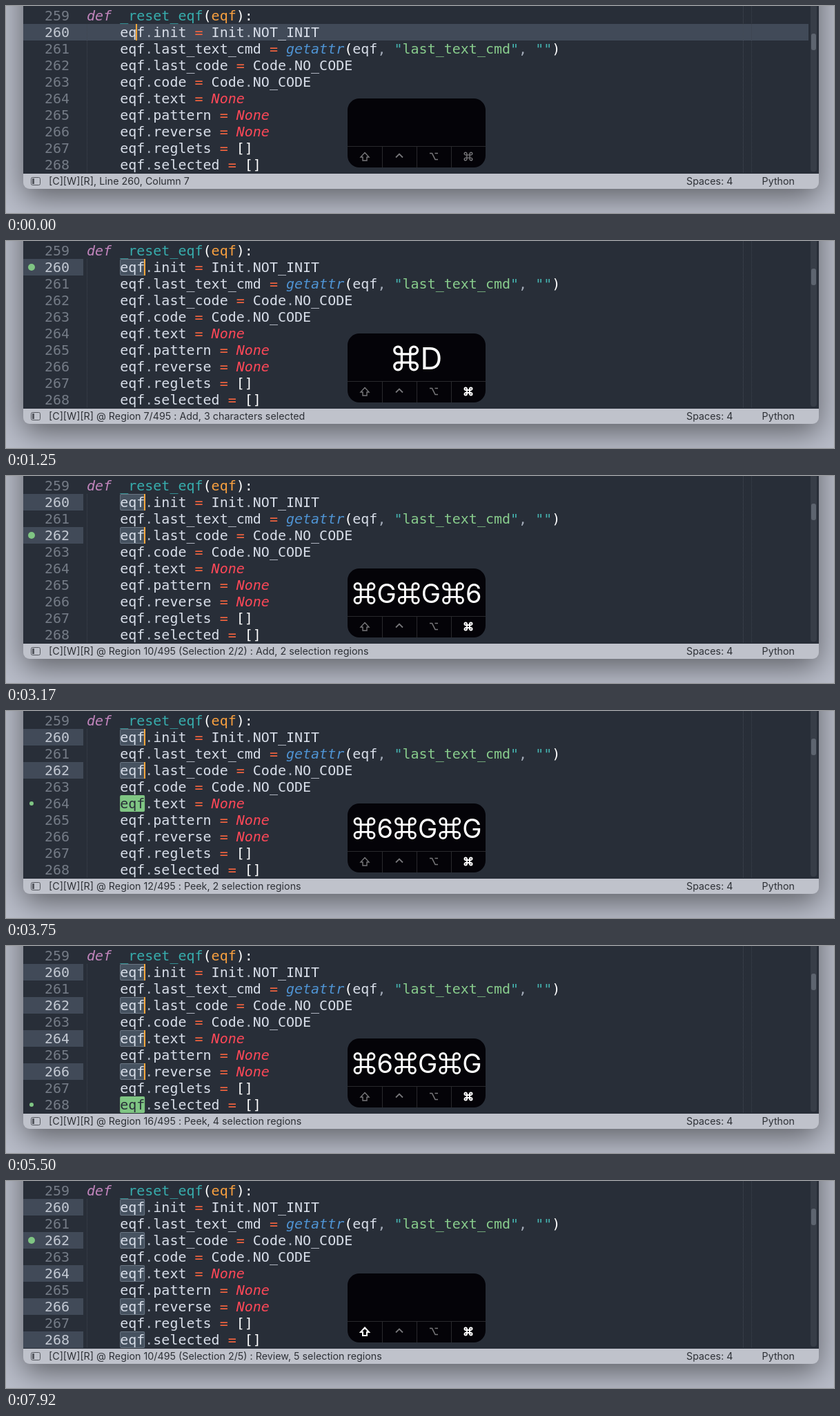
An HTML page with a canvas for the animation above (8000 ms loop, 1200 by 300 pixels).

```html
<!DOCTYPE html>
<html lang="en">
<head>
<meta charset="utf-8">
<title>Multiple selection</title>
<style>
html, body { margin: 0; width: 100%; height: 100%; overflow: hidden; background: #b4b8c3; }
canvas { display: block; }
</style>
</head>
<body>
<canvas id="stage" width="1200" height="300"></canvas>
<script>
const ctx = document.getElementById('stage').getContext('2d');
const LOOP = 8000, FIRST = 259, ROW = 24, CHAR = 12.04, CODE_X = 117;
const BG = '#282e38', ACTIVE = '#414a58', TEXT = '#d8dee9', CARET = '#f9a73c', GREEN = '#7fc583';
const MONO = '20px "DejaVu Sans Mono", monospace';
const UI = 'Inter, sans-serif';

const code = [
  'def _reset_eqf(eqf):',
  '    eqf.init = Init.NOT_INIT',
  '    eqf.last_text_cmd = getattr(eqf, "last_text_cmd", "")',
  '    eqf.last_code = Code.NO_CODE',
  '    eqf.code = Code.NO_CODE',
  '    eqf.text = None',
  '    eqf.pattern = None',
  '    eqf.reverse = None',
  '    eqf.reglets = []',
  '    eqf.selected = []'
];

// pattern, colour, italic
const syntax = [
  ['^def', '#c285bd', 1],
  ['_reset_eqf', '#37adad'],
  ['eqf(?=\\))', '#f9a03f'],
  ['getattr', '#4f94d4', 1],
  ['None', '#ff4858', 1],
  ['=', '#f9653f'],
  ['"', '#45b3b0'],
  ['last_text_cmd(?=")', '#88cc8c'],
  ['[()\\[\\]:]', '#ffffff'],
  ['[.,]', '#a4acb9'],
  ['\\w+|\\s+', TEXT]
];
const token = new RegExp(syntax.map(s => `(${s[0]})`).join('|'), 'g');

// time, key; the first region is on line 260, line 261 holds regions 8 and 9
const keys = [
  [1080, 'D'], [1830, 'G'], [2220, 'G'], [2600, 'G'], [2950, '6'],
  [3330, 'G'], [3590, 'G'], [3850, '6'], [4170, 'G'], [4480, 'G'],
  [4770, '6'], [5060, 'G'], [5360, 'G'], [5700, '6'],
  [6850, 'back'], [7130, 'back'], [7420, 'back']
];
const CMD_DOWN = 960, SHIFT_DOWN = 6760;

const rowY = line => 2 + (line - FIRST) * ROW;
const lineOf = region => region < 8 ? 260 : region < 10 ? 261 : region + 252;
const colOf = region => region === 9 ? 32 : 4;

function stateAt(t) {
  const s = { region: 0, picked: [], mode: '', typed: [], index: 0, last: 0 };
  for (const [at, key] of keys) {
    if (at > t) break;
    s.last = at;
    if (key === 'back') {
      s.mode = 'Review';
      s.index--;
      s.region = s.picked[s.index - 1];
      continue;
    }
    s.typed.push(key);
    if (key === 'G') {
      s.mode = 'Peek';
      s.region++;
    } else {
      s.mode = 'Add';
      s.region = s.region || 7;
      s.picked.push(s.region);
      s.index = s.picked.length;
    }
  }
  return s;
}

function statusText(s) {
  if (!s.mode) return '[C][W][R], Line 260, Column 7';
  const n = s.picked.length;
  const place = n > 1 && s.mode !== 'Peek' ? ` (Selection ${s.index}/${n})` : '';
  const count = n > 1 ? `${n} selection regions` : '3 characters selected';
  return `[C][W][R] @ Region ${s.region}/495${place} : ${s.mode}, ${count}`;
}

function rect(x, y, w, h, fill) {
  ctx.fillStyle = fill;
  ctx.fillRect(x, y, w, h);
}

function round(x, y, w, h, r, fill) {
  ctx.beginPath();
  ctx.roundRect(x, y, w, h, r);
  ctx.fillStyle = fill;
  ctx.fill();
}

function text(str, x, y, font, fill) {
  ctx.font = font;
  ctx.fillStyle = fill;
  ctx.fillText(str, x, y);
}

function dashed(x, y, color) {
  ctx.setLineDash([1, 1]);
  ctx.strokeStyle = color;
  ctx.lineWidth = 1;
  ctx.beginPath();
  ctx.moveTo(x + .5, y);
  ctx.lineTo(x + .5, 242);
  ctx.stroke();
  ctx.setLineDash([]);
}

function drawWindow() {
  rect(0, 0, 1200, 300, '#b9bdc9');
  ctx.save();
  ctx.shadowColor = 'rgba(0,0,0,.5)';
  ctx.shadowBlur = 44;
  ctx.shadowOffsetY = 12;
  round(25, -60, 1153, 325, 9, '#bfc2cb');
  ctx.restore();
  rect(25, 0, 1153, 243, BG);
}

function drawCode() {
  code.forEach((src, i) => {
    const y = rowY(FIRST + i) + 19;
    for (const m of src.matchAll(token)) {
      const [, color, italic] = syntax[m.slice(1).findIndex(g => g !== undefined)];
      text(m[0], CODE_X + m.index * CHAR, y, (italic ? 'italic ' : '') + MONO, color);
    }
  });
}

function drawMark(region, peek) {
  const x = CODE_X + colOf(region) * CHAR, y = rowY(lineOf(region));
  round(x, y, 36, 24, 2, peek ? GREEN : '#6a7684');
  if (!peek) round(x + 1, y + 1, 34, 22, 1, '#465260');
  text('eqf', x, y + 19, MONO, peek ? BG : TEXT);
}

function drawEditor(s, t) {
  const active = s.picked.length ? s.picked.map(lineOf) : [260];
  for (const line of active) rect(25, rowY(line), s.mode ? 87 : 1138, 24, ACTIVE);
  dashed(117, 26, '#3e4550');
  dashed(1068, 0, '#434a55');
  dashed(1080, 0, '#3b424d');
  round(1166, -10, 9, 250, 4, '#373d47');
  round(1167, 40, 7, 24, 3, '#5d646f');

  for (let line = FIRST; line < FIRST + code.length; line++) {
    text(line, 56, rowY(line) + 19, MONO, active.includes(line) ? '#c3c9d3' : '#747b86');
  }
  drawCode();
  for (const r of s.picked) drawMark(r);
  if (s.mode === 'Peek') drawMark(s.region, true);

  const phase = (t - s.last) % 1000;
  if (phase < 500 || phase >= 800) {
    if (s.mode) s.picked.forEach(r => rect(200, rowY(lineOf(r)), 2, 24, CARET));
    else rect(188, rowY(260), 2, 24, CARET);
  }
  if (s.mode) {
    ctx.beginPath();
    ctx.arc(37, rowY(lineOf(s.region)) + 12, s.mode === 'Peek' ? 3 : 5, 0, 7);
    ctx.fillStyle = GREEN;
    ctx.fill();
  }
}

function drawStatus(s) {
  const font = '14.3px ' + UI, ink = '#2d3036';
  rect(25, 243, 1153, 10, '#bfc2cb');
  ctx.strokeStyle = '#55585f';
  ctx.lineWidth = 1;
  ctx.beginPath();
  ctx.roundRect(36.5, 248.5, 13, 11, 2);
  ctx.stroke();
  rect(38, 250, 3, 8, '#55585f');
  text(statusText(s), 62, 259, font, ink);
  text('Spaces: 4', 986, 259, font, ink);
  text('Python', 1095.5, 259, font, ink);
}

function strokeAt(x, y, color, width, path) {
  ctx.save();
  ctx.translate(x, y);
  ctx.strokeStyle = color;
  ctx.lineWidth = width;
  ctx.beginPath();
  path();
  ctx.stroke();
  ctx.restore();
}

function command(x, y, size, color, width) {
  const unit = (size - width) / 6, a = unit * 1.1, r = unit * .95;
  strokeAt(x, y, color, width, () => {
    for (let i = 0; i < 4; i++) {
      ctx.moveTo(a, -a - r);
      ctx.lineTo(a, a + r);
      ctx.arc(a + r, a + r, r, Math.PI, -Math.PI / 2, true);
      ctx.rotate(Math.PI / 2);
    }
  });
}

function polyline(...points) {
  points.forEach(([x, y], i) => i ? ctx.lineTo(x, y) : ctx.moveTo(x, y));
}

function drawTyped(typed) {
  ctx.font = '100px ' + UI;
  const widths = typed.map(k => ctx.measureText(k).width / 100);
  const total = widths.reduce((sum, w) => sum + w + .95, 0);
  const size = Math.min(44, 188 / total);
  let x = 595.5 - total * size / 2;
  typed.forEach((key, i) => {
    command(x + size * .475, 170, size * .84, '#fff', size * .075);
    x += size * .95;
    text(key, x, 170 + size * .364, size + 'px ' + UI, '#fff');
    x += widths[i] * size;
  });
}

function drawKeys(s, t) {
  round(495, 134, 200, 100, 17, '#040308');
  rect(495, 203, 200, 1, '#29292d');
  for (const x of [545, 595, 645]) rect(x, 204, 1, 30, '#29292d');

  const dim = '#77777a';
  const shift = t >= SHIFT_DOWN, cmd = t >= CMD_DOWN;
  strokeAt(520, 218.5, shift ? '#fff' : dim, shift ? 2 : 1.4, () => {
    polyline([0, -6], [6, .5], [3, .5], [3, 5.5], [-3, 5.5], [-3, .5], [-6, .5]);
    ctx.closePath();
  });
  strokeAt(570, 217, dim, 1.8, () => polyline([-5, 2.5], [0, -2.5], [5, 2.5]));
  strokeAt(620, 218, dim, 1.6, () => {
    polyline([-6, -4.5], [-2.5, -4.5], [2, 4.5], [6, 4.5]);
    polyline([1.5, -4.5], [6, -4.5]);
  });
  command(670, 218, 13, cmd ? '#fff' : dim, cmd ? 1.9 : 1.4);
  if (!shift) drawTyped(s.typed.slice(-3));
}

const start = performance.now();
function tick() {
  const t = (performance.now() - start) % LOOP, s = stateAt(t);
  drawWindow();
  drawEditor(s, t);
  drawStatus(s);
  drawKeys(s, t);
  requestAnimationFrame(tick);
}
tick();
</script>
</body>
</html>
```
